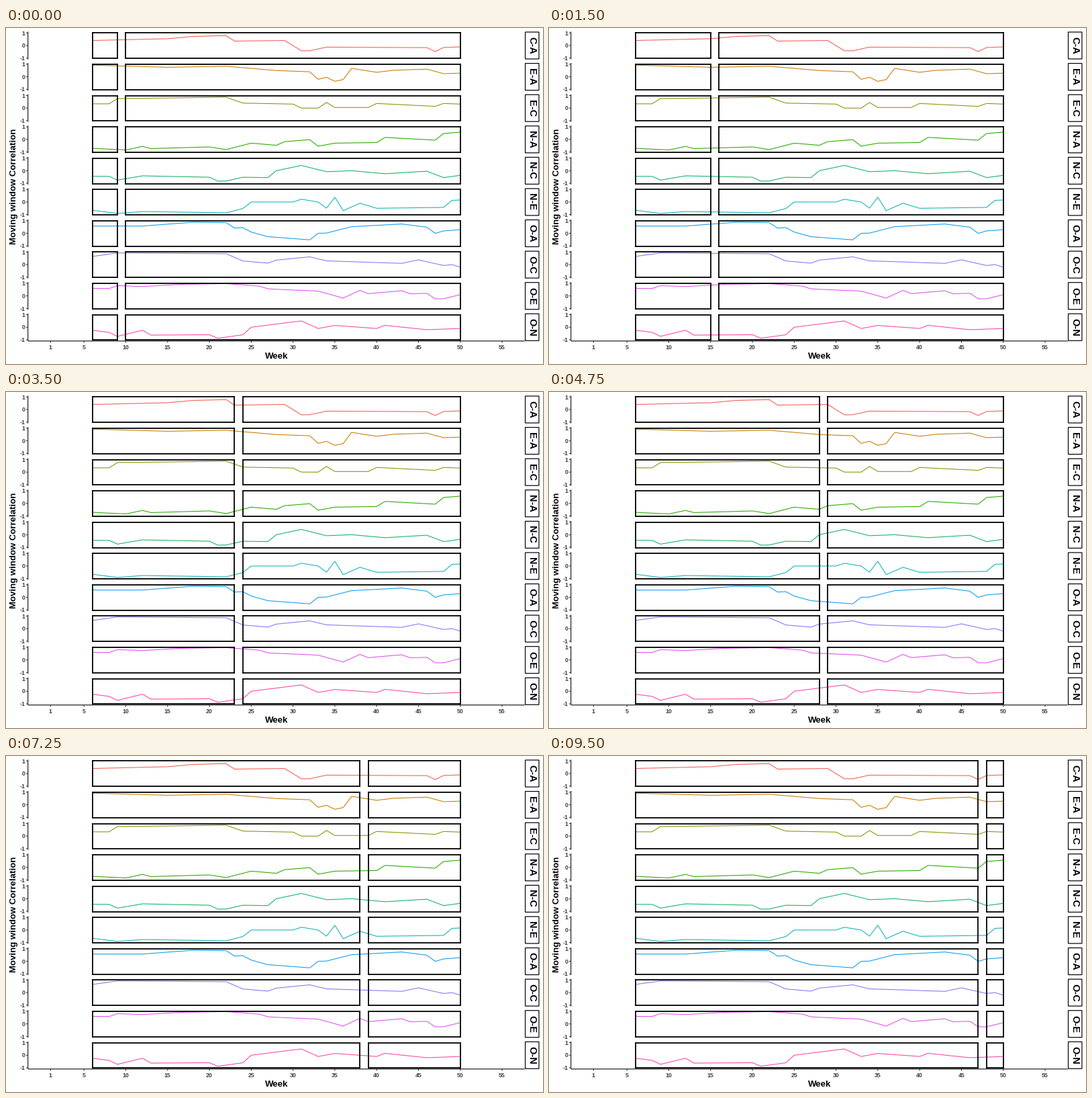
A matplotlib script that plays this animation: 800 by 500 pixels, repeating every 9750 ms.

```python
import math

import matplotlib.pyplot as plt
import numpy as np
from matplotlib.animation import FuncAnimation
from matplotlib.collections import PolyCollection
from matplotlib.patches import Rectangle

W, H, DPI = 800, 500, 100
FRAMES, INTERVAL = 39, 250
PT = 72 / DPI  # points per pixel

LEFT, RIGHT = 32.7, 772.7
TOP, PITCH, PANEL = 5.5, 46.58, 41.08
BOTTOM = TOP + 9 * PITCH + PANEL
WEEK = (RIGHT - LEFT) / 59.4
UNIT = PANEL / 2.2
THIN, BAR = 1.07, 1.8
FIRST, LAST = 6, 50
GREY = "#404040"

# Turning points of each line (week: correlation), straight in between
SERIES = {
    "C-A": ("#F75D55", {6: .4, 15: .54, 18: .72, 22: .79, 23: .35, 29: .4,
                        31: -.42, 32: -.42, 34: -.13, 46: -.17, 47: -.48,
                        48: -.16, 50: -.11}),
    "E-A": ("#CA7C00", {6: .93, 15: .76, 22: .84, 28: .5, 32: .4, 33: -.2,
                        34: -.04, 35: -.36, 36: -.22, 37: .67, 40: .36,
                        42: .52, 46: .61, 48: .25, 50: .29}),
    "E-C": ("#8E9200", {6: .34, 8: .34, 9: .76, 22: .87, 24: .4, 30: .32,
                        31: 0, 33: 0, 34: .45, 35: .05, 39: .05, 40: .37,
                        47: .14, 48: .37, 50: .32}),
    "N-A": ("#2AA800", {6: -.71, 10: -.84, 12: -.56, 13: -.73, 20: -.6,
                        22: -.81, 25: -.3, 28: -.47, 29: -.18, 32: -.02,
                        33: -.54, 35: -.3, 40: -.25, 41: .16, 47: -.06,
                        48: .47, 50: .58}),
    "N-C": ("#12B368", {6: -.45, 8: -.45, 9: -.75, 12: -.41, 20: -.52,
                        21: -.83, 22: -.82, 24: -.52, 27: -.55, 28: 0,
                        31: .42, 34: -.08, 37: 0, 41: -.24, 46: -.04,
                        48: -.55, 50: -.37}),
    "N-E": ("#12B2B8", {6: -.66, 9: -.91, 12: -.76, 22: -.86, 24: -.52,
                        25: 0, 30: 0, 31: .22, 33: 0, 34: -.49, 35: .38,
                        36: -.69, 38: -.1, 40: -.5, 48: -.43, 49: .13,
                        50: .16}),
    "O-A": ("#109CF0", {6: .58, 12: .58, 18: .88, 22: .85, 23: .42, 24: .45,
                        25: .1, 27: -.27, 32: -.52, 33: 0, 34: .02, 37: .53,
                        43: .74, 46: .49, 47: 0, 48: .19, 50: .29}),
    "O-C": ("#8078FA", {6: .65, 9: .93, 22: .87, 24: .29, 27: .12, 28: .36,
                        32: .62, 34: .3, 43: .1, 45: .38, 48: -.07, 49: 0,
                        50: -.2}),
    "O-E": ("#E050EE", {6: .6, 8: .59, 9: .82, 12: .75, 17: .93, 22: .98,
                        26: .78, 27: .56, 33: .38, 36: -.17, 38: .44,
                        39: .18, 43: .41, 44: .17, 46: .21, 47: -.23,
                        48: -.23, 50: .1}),
    "O-N": ("#FB46A8", {6: -.24, 8: -.41, 9: -.73, 12: -.24, 13: -.63,
                        20: -.6, 21: -.88, 24: -.6, 25: 0, 31: .5, 33: -.1,
                        35: .14, 40: -.1, 41: .15, 46: -.2, 50: -.1}),
}

plt.rcParams["font.family"] = "Liberation Sans"
fig = plt.figure(figsize=(W / DPI, H / DPI), dpi=DPI, facecolor="white")
ax = fig.add_axes([0, 0, 1, 1])
ax.set_xlim(0, W)
ax.set_ylim(H, 0)
ax.axis("off")


def px(week):
    return LEFT + (week + 1.7) * WEEK


def py(row, value):
    return TOP + row * PITCH + PANEL / 2 - value * UNIT


def stroke(xs, ys, color="black"):
    ax.plot(xs, ys, color=color, lw=THIN * PT, zorder=1, snap=False,
            solid_capstyle="butt", solid_joinstyle="round")


def label(x, y, text, size, color="black", ha="center", angle=0):
    ax.text(x, y, text, fontsize=size * PT, fontweight="bold", color=color,
            ha=ha, va="baseline", rotation=angle, rotation_mode="anchor")


def add_row(row, name, color, points):
    """One facet: axis, strip label and correlation line."""
    top = TOP + row * PITCH
    stroke([LEFT, LEFT], [top, top + PANEL])
    for v in (-1, 0, 1):
        y = py(row, v)
        stroke([LEFT - 2.75, LEFT], [y, y], "#333333")
        label(LEFT - 4.7, y + 3.15, str(v), 8.8, GREY, "right")
    ax.add_patch(Rectangle((RIGHT + 0.85, top + 0.55), 20.4, PANEL - 1.1,
                           fc="white", ec="black", lw=1.2 * PT, snap=False))
    label(779.5, top + PANEL / 2, name, 14.5, angle=-90)
    weeks = np.arange(FIRST, LAST + 1)
    values = np.interp(weeks, list(points), list(points.values()))
    stroke(px(weeks), py(row, values), color)


for row, (name, (color, points)) in enumerate(SERIES.items()):
    add_row(row, name, color, points)

# Shared week axis and titles
stroke([LEFT, RIGHT], [BOTTOM, BOTTOM])
for week in [1, *range(5, 56, 5)]:
    stroke([px(week)] * 2, [BOTTOM, BOTTOM + 2.75], "#333333")
    label(px(week), 478.1, str(week), 8.8, GREY)
label((LEFT + RIGHT) / 2, 491.8, "Week", 13.2)
label(15.2, (TOP + BOTTOM) / 2, "Moving window Correlation", 13.3, angle=90)


def bar(x0, y0, x1, y1):
    """Thick horizontal or vertical bar from corner to corner."""
    h = BAR / 2
    return [(x0 - h, y0 - h), (x1 + h, y0 - h),
            (x1 + h, y1 + h), (x0 - h, y1 + h)]


def box(row, start, end):
    """Pixel-aligned frame around the weeks start..end of a row."""
    l, r = round(px(start)), round(px(end))
    t, b = round(py(row, 1)), math.ceil(py(row, -1))
    return [bar(l, t, r, t), bar(l, b, r, b),
            bar(l, t, l, b), bar(r, t, r, b)]


boxes = PolyCollection([], facecolors="black", edgecolors="none", zorder=2)
boxes.set_snap(False)
ax.add_collection(boxes, autolim=False)


def update(i):
    split = 9 + i
    bars = []
    for row in range(len(SERIES)):
        bars += box(row, FIRST, split) + box(row, split + 1, LAST)
    boxes.set_verts(bars)
    return [boxes]


anim = FuncAnimation(fig, update, frames=FRAMES, interval=INTERVAL,
                     repeat=True, repeat_delay=0, blit=False)
plt.show()
```
